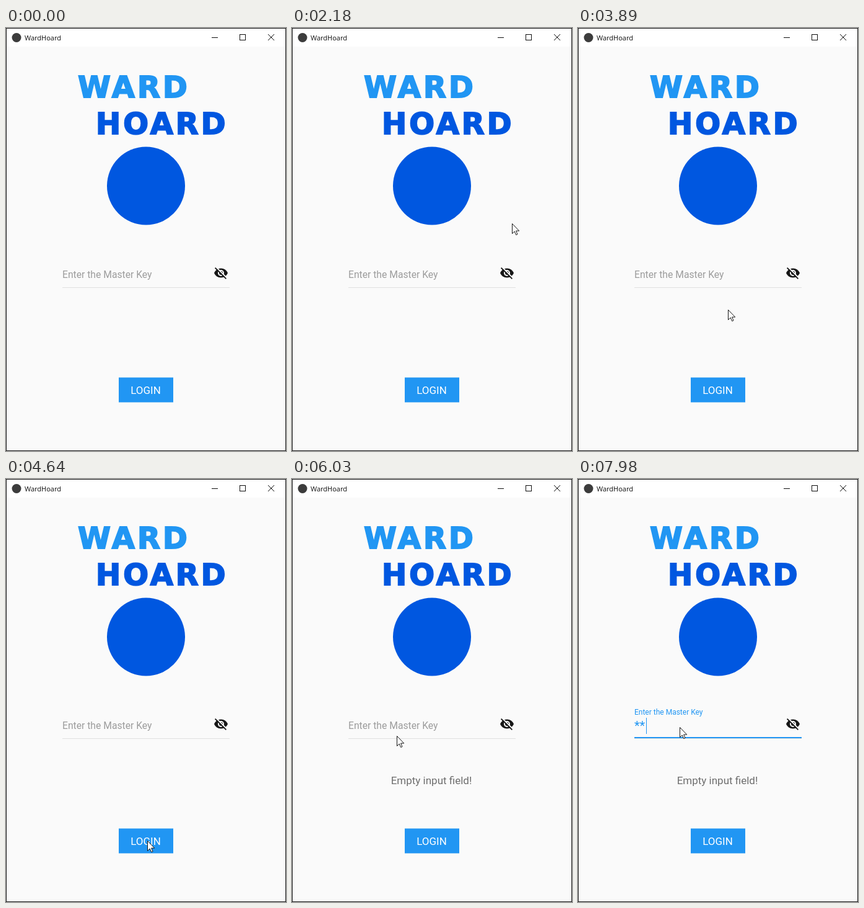
An HTML page that plays this animation: 452x682 px, repeating every 8000 ms.

```html
<!DOCTYPE html>
<html lang="en">
<head>
<meta charset="utf-8">
<title>WardHoard</title>
<style>
  html, body { margin: 0; width: 100%; height: 100%; overflow: hidden; }
  svg { display: block; width: 452px; height: 682px; font-family: Roboto, sans-serif; }
  .brand { font: bold 48px "DejaVu Sans", sans-serif; letter-spacing: 4px; stroke-width: 2; }
  .glyph { fill: none; stroke: #111; shape-rendering: crispEdges; }
</style>
</head>
<body>
<svg viewBox="0 0 452 682">
  <rect width="452" height="682" fill="#fafafa"/>
  <rect width="452" height="30" fill="#fff"/>
  <rect x=".5" y=".5" width="451" height="681" fill="none" stroke="#1c1c1c"/>

  <circle cx="17" cy="15.5" r="7.5" fill="#3c3c3c"/>
  <text x="30" y="20" font-size="11" fill="#111" style="font-family:'Open Sans',sans-serif">WardHoard</text>
  <path class="glyph" d="M332 15.5h10M377.5 10.5h9v9h-9z"/>
  <path d="M423 10l10 10m0-10l-10 10" stroke="#111"/>

  <text class="brand" x="116" y="112" fill="#2196f3" stroke="#2196f3">WARD</text>
  <text class="brand" x="145" y="171" fill="#0057e0" stroke="#0057e0">HOARD</text>
  <circle cx="226" cy="254.5" r="63" fill="#0057e0"/>

  <path d="M91 418.5h270" stroke="#e0e0e0"/>
  <path id="focusLine" stroke="#2196f3" stroke-width="2"/>
  <text id="hint" x="91">Enter the Master Key</text>
  <text id="typed" x="91" y="405" font-size="20" fill="#2196f3"></text>
  <path id="caret" stroke="#2196f3"/>

  <!-- hidden-password eye -->
  <g transform="translate(335 383)" fill="#171717">
    <path d="M1 12C2.7 7.6 7 4.5 12 4.5S21.3 7.6 23 12C21.3 16.4 17 19.5 12 19.5S2.7 16.4 1 12z"/>
    <circle cx="12" cy="12" r="5" fill="#fafafa"/>
    <circle cx="12" cy="12" r="3"/>
    <path d="M4 2.5L22 20.5" stroke="#fafafa" stroke-width="1.8"/>
    <path d="M2.6 3.6L20.4 21.4" stroke="#171717" stroke-width="1.8"/>
  </g>

  <text id="message" x="225" y="492" font-size="17" text-anchor="middle" fill="#6e6e6e">Empty input field!</text>
  <rect x="182" y="563.5" width="88" height="40" fill="#2196f3"/>
  <text x="225.5" y="590" font-size="17" text-anchor="middle" fill="#fff">LOGIN</text>

  <path id="pointer" d="M.5 .5V16.5L4.2 13L6.7 18.6L9 17.6L6.6 12.1H11.7z" fill="#fff" stroke="#171717"/>
</svg>
<script>
const LOOP = 8000, MESSAGE_AT = 4850, FOCUS_AT = 6370, KEYS_AT = [7480, 7760];
const [focusLine, hint, typed, caret, message, pointer] =
  ["focusLine", "hint", "typed", "caret", "message", "pointer"].map(id => document.getElementById(id));

const easeIn = p => p * p;
const easeOut = p => 1 - (1 - p) ** 2;
const easeInOut = p => p * p * (3 - 2 * p);
const mix = (a, b, p) => a + (b - a) * p;
const progress = (t, start, end) => Math.min(1, Math.max(0, (t - start) / (end - start)));
const show = (el, on) => el.setAttribute("visibility", on ? "visible" : "hidden");

const moves = [
  { start: 1950, end: 2750, from: [452, 300], to: [255, 331], ease: easeOut },
  { start: 3400, end: 4400, from: [255, 331], to: [228, 583], ease: easeInOut },
  { start: 5150, end: 5450, from: [228, 583], to: [211, 542], ease: easeIn },
  { start: 5450, end: 6300, from: [211, 542], to: [164, 400], ease: easeOut },
];

function drawPointer(t) {
  const move = moves.filter(m => t >= m.start).pop();
  show(pointer, move);
  if (!move) return;
  const p = move.ease(progress(t, move.start, move.end));
  const [x, y] = move.from.map((v, i) => Math.round(mix(v, move.to[i], p)));
  pointer.setAttribute("transform", `translate(${x} ${y})`);
}

function drawField(t) {
  const p = easeOut(progress(t, FOCUS_AT, FOCUS_AT + 200));
  const half = 135 * p;
  focusLine.setAttribute("d", `M${226 - half} 417h${2 * half}`);
  hint.setAttribute("y", mix(403, 380, p));
  hint.setAttribute("font-size", mix(15.7, 12, p));
  hint.setAttribute("fill", p ? "#2196f3" : "#9c9c9c");

  const pressed = KEYS_AT.filter(at => t >= at);
  typed.textContent = "*".repeat(pressed.length);
  const x = 91.5 + 9.5 * pressed.length;
  caret.setAttribute("d", `M${x} 385v26`);
  const idle = t - (pressed.pop() ?? FOCUS_AT);
  show(caret, idle >= 0 && idle % 1000 < 500);
}

function frame(now) {
  const t = now % LOOP;
  drawPointer(t);
  drawField(t);
  show(message, t >= MESSAGE_AT);
  requestAnimationFrame(frame);
}
frame(0);
</script>
</body>
</html>
```
